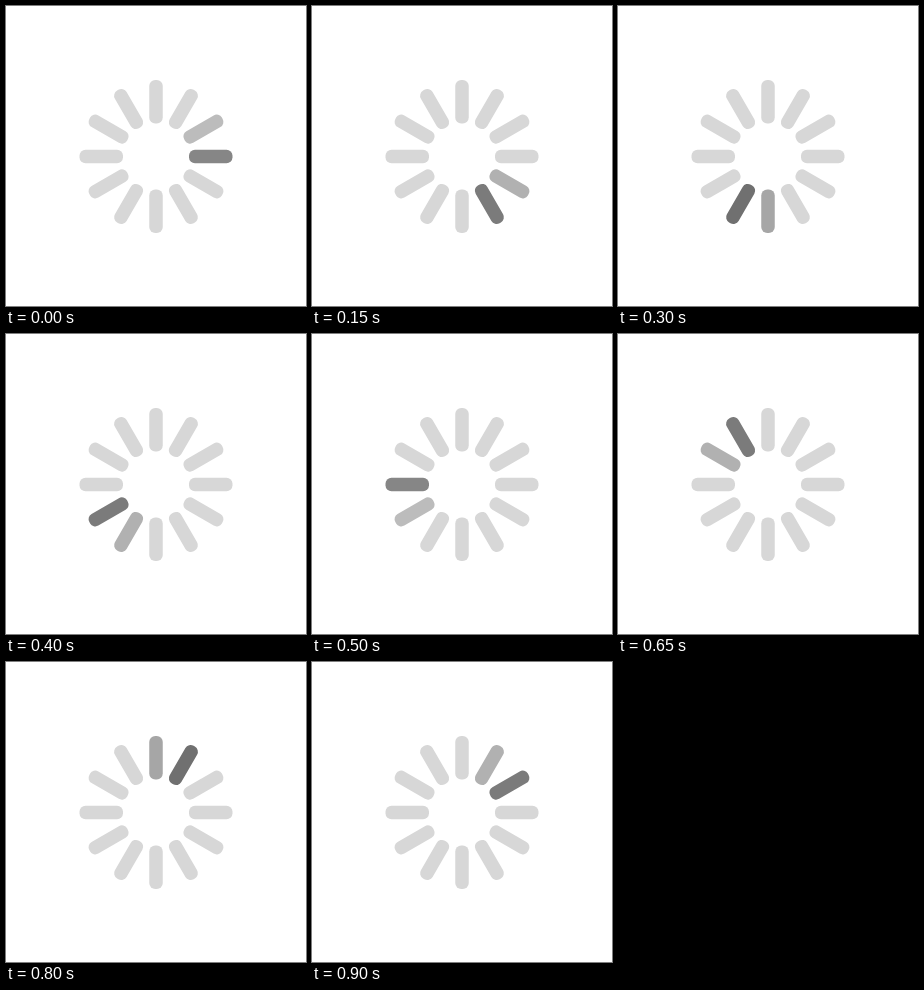
Animation, 300 px wide and 300 px high, one loop 0.95 s. Source, as an HTML page:

```html
<!DOCTYPE html>
<html lang="en">
<head>
<meta charset="utf-8">
<title>Loading spinner</title>
<style>
  html, body { margin: 0; width: 100%; height: 100%; overflow: hidden; background: #fff; }
  svg { display: block; width: 100vw; height: 100vh; }
</style>
</head>
<body>
<svg viewBox="0 0 300 300"><g id="spokes" transform="translate(150 150.5)"></g></svg>
<script>
const LOOP = 950, STEP = 50, TURN = 1000, COUNT = 12;
const DARK = 107, LIGHT = 215;
const LEAD = 0.5, FADE = 2; // in spokes

const group = document.getElementById('spokes');
const spokes = Array.from({ length: COUNT }, (_, i) => {
  const bar = document.createElementNS('http://www.w3.org/2000/svg', 'rect');
  const attrs = {
    x: 33, y: -6.75, width: 43.5, height: 13.5, rx: 6,
    transform: `rotate(${i * 360 / COUNT})`
  };
  for (const name in attrs) bar.setAttribute(name, attrs[name]);
  return group.appendChild(bar);
});

// Each spoke snaps dark just before its turn, then fades back.
function draw(ms) {
  const time = Math.floor((ms % LOOP) / STEP) * STEP;
  const head = time / TURN * COUNT + LEAD;
  spokes.forEach((bar, i) => {
    const age = (head - i + COUNT) % COUNT;
    const grey = Math.round(DARK + (LIGHT - DARK) * Math.min(age / FADE, 1));
    bar.setAttribute('fill', `rgb(${grey},${grey},${grey})`);
  });
}

const start = performance.now();
function tick() {
  draw(performance.now() - start);
  requestAnimationFrame(tick);
}
tick();
</script>
</body>
</html>
```
